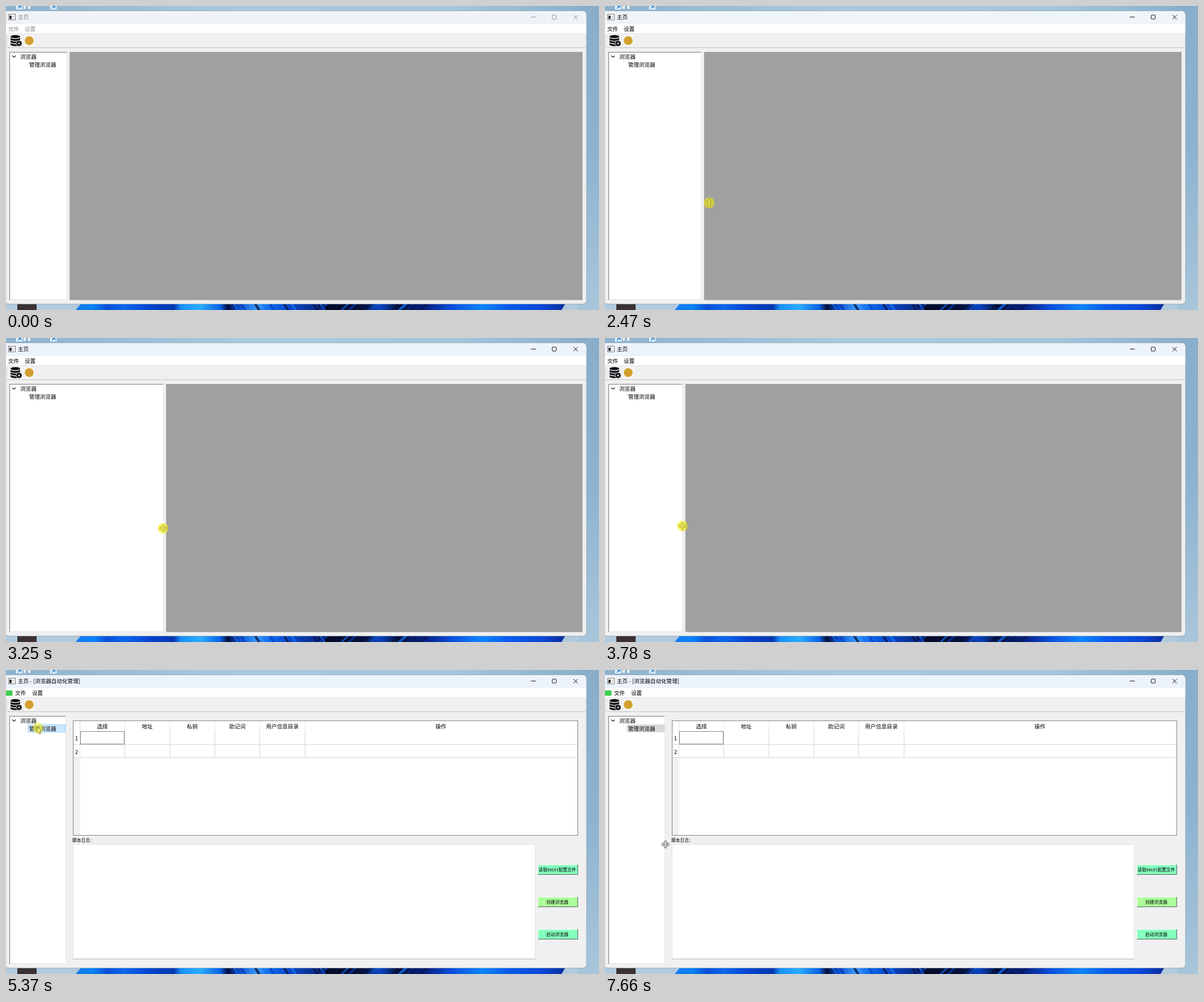
Recreate the animation shown at these times as an HTML page. Size 1046 by 536 pixels, loop 8000 ms.

```html
<!DOCTYPE html>
<html lang="zh-CN">
<head>
<meta charset="utf-8">
<title>主页</title>
<style>
html, body { margin: 0; width: 100%; height: 100%; overflow: hidden; background: #a9c5da; }
svg { display: block; width: 1046px; height: 536px; }
text { font: 9.6px "Noto Sans CJK SC", "Noto Sans CJK", "Noto Sans", sans-serif; fill: #000; white-space: pre; }
.mid { text-anchor: middle; }
.small { font: 7.8px "Noto Sans Mono CJK SC", "Noto Sans CJK SC", "Noto Sans CJK", monospace; }
</style>
</head>
<body>
<svg id="stage" viewBox="0 0 1046 536" xmlns="http://www.w3.org/2000/svg"></svg>
<script>
const LOOP = 8000;
const stage = document.getElementById('stage');

const rect = (x, y, w, h, fill, more = '') =>
  `<rect x="${x}" y="${y}" width="${w}" height="${h}" fill="${fill}" ${more}/>`;
const line = (d, color, more = '') =>
  `<path d="${d}" fill="none" stroke="${color}" ${more}/>`;
const label = (x, y, s, cls = '', more = '') =>
  `<text x="${x}" y="${y + (cls.includes('small') ? 2.9 : 3.5)}" class="${cls}" ${more}>${s}</text>`;
const gradient = (id, stops, dir = '') =>
  `<linearGradient id="${id}" ${dir}>` +
  stops.map(([o, c]) => `<stop offset="${o}" stop-color="${c}"/>`).join('') +
  '</linearGradient>';

function desktop() {
  const petals = [
    [0, '#1679ee'], [.035, '#0a84fa'], [.065, '#0a4fd8'], [.1, '#0b66f0'], [.15, '#0644cf'],
    [.2, '#0536b0'], [.215, '#1790fb'], [.255, '#2aacff'], [.295, '#0a62e8'], [.31, '#04103f'],
    [.335, '#0a4fd0'], [.37, '#3a9cff'], [.4, '#0b64ec'], [.44, '#0a46c4'], [.49, '#0a2c8c'],
    [.505, '#040a28'], [.585, '#05113c'], [.62, '#0b48c8'], [.66, '#050f38'], [.72, '#08258a'],
    [.77, '#0b50e0'], [.83, '#0e86ff'], [.88, '#0a5cf0'], [.95, '#0b48d8'], [1, '#0a2c9c']
  ];
  let folds = '';
  for (let i = 0; i < 22; i++) {
    const x = 388 + i * 17 - (i % 3) * 4, lean = i < 11 ? 8 : -14;
    folds += line(`M${x} 524L${x + lean} 537`, ['#04103c', '#1470f5', '#0a38b0'][i % 3],
      `stroke-width="${1.5 + i % 4}" opacity=".75"`);
  }
  const shortcut = x => rect(x, -4, 11, 10, '#fff') +
    line(`M${x + 2.5} 4.5L${x + 8} -.5M${x + 4} .5h4.5v4`, '#0a78d0', 'stroke-width="1.4"');
  return '<defs>' +
    gradient('sky', [[0, '#8db2ce'], [.4, '#a9c9de'], [.75, '#a5c6dc'], [1, '#86adca']]) +
    gradient('side', [[0, '#88aecb'], [.45, '#8cb2d0'], [1, '#a9c5da']], 'x2="0" y2="1"') +
    gradient('petals', petals) + '</defs>' +
    rect(0, 0, 1046, 536, '#b1cadd') + rect(0, 0, 1046, 30, 'url(#sky)') +
    rect(1010, 0, 36, 536, 'url(#side)') +
    '<path d="M133 524H987L980 536H123Z" fill="url(#petals)"/>' + folds +
    shortcut(18) + shortcut(78) +
    rect(31, 0, 4, 5, '#f2f2ee') + rect(39, 0, 4, 5, '#f2f2ee') +
    rect(20, 520, 34, 16, '#3b3032');
}

function toolbar() {
  let dots = '', teeth = '';
  for (let y = 51; y < 72; y += 3) dots += rect(1.5, y, 1, 1, '#b4b4b4');
  for (let a = 0; a < 360; a += 45)
    teeth += rect(21.9, 61, 2.2, 10, '#0b0b12', `transform="rotate(${a} 23 66)"`);
  const disk = y => `<path d="M8 ${y}c3 3 14 3 17 0v3.2c-3 3-14 3-17 0z" fill="#0b0b12"/>`;
  return dots +
    '<ellipse cx="16.5" cy="54" rx="8.5" ry="2.8" fill="#0b0b12"/>' +
    disk(56) + disk(60.6) + disk(65.2) +
    '<circle cx="23" cy="66" r="5.6" fill="#f0f0f0"/>' + teeth +
    '<circle cx="23" cy="66" r="3.6" fill="#0b0b12"/><circle cx="23" cy="66" r="1.6" fill="#f0f0f0"/>' +
    rect(32, 52, 18, 19, '#f6f5f1') +
    '<circle cx="41" cy="61" r="7.8" fill="#d3a02f"/>';
}

function frame() {
  return rect(-2, 8.5, 1026, 517, '#f0f0f0', 'rx="7" stroke="#87a0b4" stroke-opacity=".7"') +
    '<path id="caption" d="M-2 32V9H1017Q1023.5 9 1023.5 16V32Z"/>' +
    rect(-2, 32, 1025.5, 16, '#fff') +
    line('M0 48.5H1023.5', '#e9e9e9') + line('M0 73.5H1023.5', '#c3c3c3') +
    rect(4.5, 14.5, 12, 10, '#fafafa', 'stroke="#777"') +
    rect(6, 17, 4, 6, '#333') + line('M11.5 18.5h3M11.5 21.5h3', '#b5b5b5') +
    '<g id="chrome">' + label(21, 19.5, '主页', '', 'id="name"') +
    label(4, 40.5, '文件', '', 'id="file"') + label(33, 40.5, '设置', '', 'id="setup"') + '</g>' +
    '<g id="buttons" fill="none"><path d="M926 19.5h8.5"/>' +
    '<rect x="963.5" y="16" width="7" height="7" rx="1.2"/>' +
    '<path d="M1001 16l7.5 7.5M1008.5 16l-7.5 7.5"/></g>' + toolbar();
}

function tree() {
  return '<rect id="panel" x="6" y="81" height="437" fill="#fff"/>' +
    '<path id="panelLight" fill="none" stroke="#e6e6e6"/>' +
    '<path id="panelDark" fill="none" stroke="#777"/>' +
    '<rect id="pick" x="39" y="96.5" width="65.5" height="13"/>' +
    line('M11.2 87.5l3 3 3-3', '#222', 'stroke-width="1.2"') +
    label(25, 89, '浏览器') + label(40.7, 103, '管理浏览器');
}

function manager() {
  const cols = [130.5, 209.5, 289, 368.5, 447.5, 527.5];
  const heads = [['选择', 170], ['地址', 249], ['私钥', 328.5], ['助记词', 408], ['用户信息目录', 487.5], ['操作', 767]];
  const buttons = [['读取excel配置文件', 343, '#85ffbd'], ['创建浏览器', 400, '#adff9b'], ['启动浏览器', 457, '#85ffbd']];
  return rect(109, 80, 908, 439, '#f0f0f0') +
    rect(118.5, 89.5, 890, 202, '#fff', 'stroke="#848484"') +
    rect(119, 155, 11.5, 136, '#f0f0f0') +
    cols.slice(1).map(x => line(`M${x} 90V108`, '#e8e8e8') + line(`M${x} 108V155`, '#d6d6d6')).join('') +
    line('M130.5 90V155', '#e0e0e0') +
    line('M119 131.5H1008M119 154.5H1008', '#d6d6d6') +
    rect(131.5, 108.5, 77, 22, '#fff', 'stroke="#858585"') +
    heads.map(([s, x]) => label(x, 99.5, s, 'mid')).join('') +
    label(124.5, 120.5, '1', 'mid') + label(124.5, 144, '2', 'mid') +
    label(117, 300, '脚本日志:', 'small') +
    rect(118.5, 307.5, 815, 202, '#fff', 'stroke="#e3e3e3"') +
    line('M118 509.5H934', '#b5b5b5') +
    buttons.map(([s, y, c]) => rect(938, y, 71, 18, c) +
      line(`M938.5 ${y + 18}V${y + .5}H1008`, '#e9fff2') +
      line(`M938 ${y + 17.5}H1008.5V${y}`, '#4f6659') +
      label(972.5, y + 9, s, 'mid small')).join('') +
    rect(0, 36, 11.5, 9.5, '#41cd52', 'rx="1"');
}

function pointers() {
  const style = 'fill="#fff" stroke="#222" stroke-width=".8"';
  return `<path id="arrow" ${style} d="M.3 .3V10.6L2.7 8.4 4.4 12.5 6.2 11.7 4.5 7.7H7.6Z"/>` +
    `<path id="split" ${style} d="M-1.4 -6.2H1.4V6.2H-1.4ZM-7.2 0L-3.6 -3.2V3.2ZM7.2 0L3.6 -3.2V3.2Z"/>` +
    '<circle id="press" r="9.4" fill="#f8f000"/>';
}

stage.innerHTML = desktop() + frame() + tree() +
  '<rect id="area" y="81" height="437.5" fill="#a0a0a0"/>' +
  `<g id="manager">${manager()}</g>` + pointers();

const el = {};
stage.querySelectorAll('[id]').forEach(e => el[e.id] = e);
const set = (e, attrs) => { for (const k in attrs) e.setAttribute(k, attrs[k]); };
const show = (e, on) => set(e, { visibility: on ? 'visible' : 'hidden' });

// Pointer track: time, x, y
const track = [
  [70, 300, 500], [500, 205, 408], [840, 160, 363], [900, 158, 361], [1410, 115, 347],
  [1570, 114, 347], [1940, 108, 347.5], [2280, 109, 347.5], [2470, 183, 347],
  [2900, 468, 339], [3010, 463.5, 338], [3070, 432, 337.5], [3300, 235, 335],
  [3530, 141, 332], [3720, 141, 332], [3780, 136.5, 331.5], [4180, 107, 337.5], [4400, 107, 338],
  [4640, 91, 186], [4860, 70, 125], [5150, 55, 100.5], [5620, 55, 100.5],
  [5680, 58, 108], [6050, 86, 220], [6400, 102, 304], [6470, 102, 304],
  [6520, 109, 313], [6920, 109.5, 314], [7040, 108, 310], [7499, 105, 307.5],
  [7500, 105, 307.5], [7659, 105, 307.5], [7660, 106.7, 307.5]
];
// Right edge of the tree panel
const edge = [
  [2280, 107], [2470, 169], [2900, 467], [3010, 463.5], [3070, 432], [3300, 235],
  [3530, 141], [3720, 141], [3780, 136.5], [4180, 105]
];

function sample(keys, t) {
  if (t <= keys[0][0]) return keys[0].slice(1);
  for (let i = 1; i < keys.length; i++) {
    const a = keys[i - 1], b = keys[i];
    if (t <= b[0]) {
      const k = (t - a[0]) / (b[0] - a[0]);
      return a.slice(1).map((v, j) => v + (b[j + 1] - v) * k);
    }
  }
  return keys[keys.length - 1].slice(1);
}

const within = (t, a, b) => t >= a && t < b;

function draw(t) {
  const active = t >= 450, open = t >= 5340;
  set(el.caption, { fill: t < 450 ? '#eff3f7' : t < 2500 ? '#eef4f8' : '#edf3fb' });
  set(el.chrome, { opacity: active ? 1 : .45 });
  set(el.buttons, { stroke: active ? '#111' : '#8f9296' });
  const title = open ? '主页 - [浏览器自动化管理]' : '主页';
  if (el.name.textContent !== title) el.name.textContent = title;
  set(el.file, { x: open ? 16 : 4 });
  set(el.setup, { x: open ? 46 : 33 });
  show(el.manager, open);

  const p = Math.round(sample(edge, t)[0] * 2) / 2;
  set(el.panel, { width: p - 6 });
  set(el.panelDark, { d: `M6.5 518V81.5H${p}` });
  set(el.panelLight, { d: `M6 517.5H${p + .5}V81` });
  set(el.area, { x: p + 5.3, width: 1017 - p - 5.3 });

  const [x, y] = sample(track, t);
  const over = within(t, 4400, 5900) && y < 110;
  show(el.pick, over || open);
  set(el.pick, open
    ? (over ? { fill: '#cce8ff', stroke: '#99d1ff' } : { fill: '#d9d9d9', stroke: '#d9d9d9' })
    : { fill: '#e5f3ff', stroke: '#e5f3ff' });

  const split = within(t, 1800, 4400) || within(t, 6520, 7040) || t >= 7660;
  const hidden = t < 70 || within(t, 7040, 7500);
  const place = `translate(${x} ${y})`;
  show(el.split, split && !hidden);
  show(el.arrow, !split && !hidden);
  set(el.split, { transform: place });
  set(el.arrow, { transform: place });

  const click = within(t, 5310, 5430);
  show(el.press, click || within(t, 2280, 4180));
  set(el.press, { transform: click ? `translate(${x + 1.5} ${y + 2})` : place, opacity: click ? .5 : .56 });
}

function tick(now) {
  draw(now % LOOP);
  requestAnimationFrame(tick);
}
draw(0);
requestAnimationFrame(tick);
</script>
</body>
</html>
```
